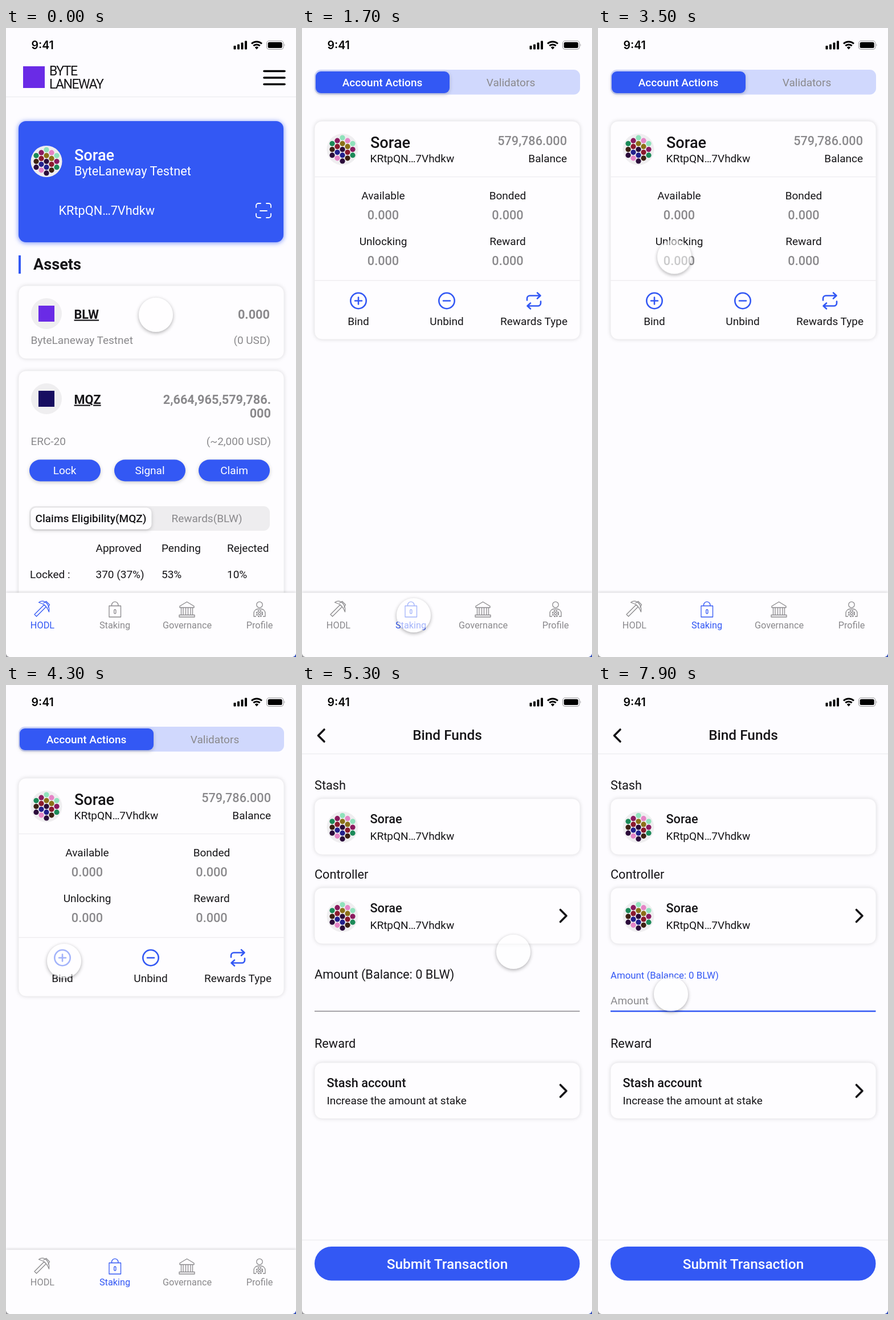
Recreate the animation shown at these times as an HTML page. Size 509 px wide and 1101 px high, loop 8000 ms.

```html
<!DOCTYPE html>
<html lang="en">
<head>
<meta charset="utf-8">
<title>Wallet staking flow</title>
<style>
  :root { --blue: #3358f4; --ink: #161518; --grey: #8a898c; --loop: 8s; }
  html, body { margin: 0; width: 100%; height: 100%; overflow: hidden; background: #fdfcff; }
  svg { display: block; width: 509px; height: 1101px; }
  text { font: 400 19px Roboto, sans-serif; fill: var(--ink); }
  .s12 { font-size: 16.3px; }
  .s16 { font-size: 21.7px; }
  .s18 { font-size: 24.4px; }
  .s20 { font-size: 27.1px; }
  .med { font-weight: 500; }
  .bold { font-weight: 700; }
  .grey { fill: var(--grey); }
  .white { fill: #fff; }
  .mid { text-anchor: middle; }
  .end { text-anchor: end; }
  .under { text-decoration: underline; text-decoration-thickness: 1.6px; text-underline-offset: 2px; }
  .clock { font: 600 19.5px Inter, sans-serif; fill: #000; }
  .word { font-size: 23px; letter-spacing: -1.5px; }
  .blue { fill: var(--blue); }
  .card { fill: #fefdff; stroke: #efeef1; filter: drop-shadow(0 0 3px rgba(0, 0, 0, .13)); }
  .hero { fill: var(--blue); filter: drop-shadow(0 1px 4px rgba(51, 88, 244, .7)); }
  .lift { filter: drop-shadow(0 2px 3px rgba(0, 0, 0, .2)); }
  .rule { stroke: #efeef1; stroke-width: 1.5; }
  .disc { fill: #efeef0; }
  .line { fill: none; stroke: var(--ink); stroke-width: 3.6; stroke-linecap: round; stroke-linejoin: round; }
  .act { fill: none; stroke: var(--blue); stroke-width: 2.6; stroke-linecap: round; stroke-linejoin: round; }

  .tab { color: var(--grey); }
  .tab text { fill: currentColor; font-size: 16.3px; text-anchor: middle; }
  .tab path, .tab circle, .tab rect { fill: none; stroke: currentColor; stroke-width: 1.3; stroke-linejoin: round; }

  .home, .stake, .bind, .nav, .idle, .focus, .off, .on { animation: var(--loop) step-end infinite; }
  .home { animation-name: home; }
  .stake { animation-name: stake; }
  .bind { animation-name: bind; }
  .nav { animation-name: nav; }
  .idle { animation-name: idle; }
  .focus { animation-name: focus; }
  .off { animation-name: off; }
  .on { animation-name: on; }
  @keyframes home { 0% { opacity: 1 } 20%, 100% { opacity: 0 } }
  @keyframes stake { 0% { opacity: 0 } 20% { opacity: 1 } 56.25%, 100% { opacity: 0 } }
  @keyframes bind { 0% { opacity: 0 } 56.25%, 100% { opacity: 1 } }
  @keyframes nav { 0% { opacity: 1 } 56.25%, 100% { opacity: 0 } }
  @keyframes idle { 0% { opacity: 1 } 97.5%, 100% { opacity: 0 } }
  @keyframes focus { 0% { opacity: 0 } 97.5%, 100% { opacity: 1 } }
  @keyframes off { 0% { color: var(--blue) } 20%, 100% { color: var(--grey) } }
  @keyframes on { 0% { color: var(--grey) } 20%, 100% { color: var(--blue) } }

  .touch {
    position: absolute; left: -30px; top: -30px; width: 60px; height: 60px; border-radius: 50%;
    background: rgba(255, 255, 255, .55);
    box-shadow: 0 2px 6px rgba(0, 0, 0, .32);
    animation: touch var(--loop) ease-in-out infinite;
  }
  @keyframes touch {
    0%, 1.25% { transform: translate(263px, 502px) }
    12.5%, 22.5% { transform: translate(196px, 1028px) }
    33.75%, 36.25% { transform: translate(199px, 233px) }
    48.75%, 57.5% { transform: translate(102px, 483px) }
    66.25% { transform: translate(371px, 467px) }
    76.25%, 88.75% { transform: translate(391px, 433px) }
    97.5%, 100% { transform: translate(128px, 541px) }
  }
</style>
</head>
<body>
<svg viewBox="0 0 509 1101">
  <defs>
    <g id="avatar"><circle class="disc" r="27.5"/></g>
    <path id="next" class="line" d="M-5.5-10.5 5 0-5.5 10.5"/>
  </defs>

  <g class="home">
    <rect x="30" y="67" width="38" height="38" fill="#6a2be6"/>
    <text class="word" x="76" y="83">BYTE</text>
    <text class="word" x="76" y="106">LANEWAY</text>
    <path d="M453 75.5h36M453 87h36M453 98.5h36" stroke="#000" stroke-width="3.6" stroke-linecap="round"/>
    <path class="rule" d="M0 120.5h509"/>

    <rect class="hero" x="22" y="163" width="465" height="212" rx="13"/>
    <use href="#avatar" x="71" y="233.5"/>
    <text class="s20 med white" x="120" y="232">Sorae</text>
    <text class="s16 white" x="120" y="257.5">ByteLaneway Testnet</text>
    <text class="s16 white" x="92.5" y="327">KRtpQN…7Vhdkw</text>
    <path d="M439 314v-3a4 4 0 0 1 4-4h4M457 307h4a4 4 0 0 1 4 4v3M465 325v3a4 4 0 0 1-4 4h-4M447 332h-4a4 4 0 0 1-4-4v-3M446 320h12" fill="none" stroke="#fff" stroke-width="1.8" stroke-linecap="round"/>

    <rect class="blue" x="22" y="398" width="4" height="32"/>
    <text class="s20 bold" x="48" y="423">Assets</text>

    <rect class="card" x="22" y="451" width="466" height="128" rx="13"/>
    <circle class="disc" cx="71" cy="500" r="27"/>
    <rect x="57" y="486" width="28" height="28" fill="#6a2be6"/>
    <text class="s16 bold under" x="119.5" y="508.5">BLW</text>
    <text class="s16 bold grey end" x="463" y="509">0.000</text>
    <text class="grey" x="43.5" y="553">ByteLaneway Testnet</text>
    <text class="grey end" x="464" y="553">(0 USD)</text>

    <rect class="card" x="22" y="600" width="466" height="440" rx="13"/>
    <circle class="disc" cx="71" cy="649" r="27"/>
    <rect x="57" y="635" width="28" height="28" fill="#170d60"/>
    <text class="s16 bold under" x="119.5" y="657.5">MQZ</text>
    <text class="s16 bold grey end" x="465" y="658">2,664,965,579,786.</text>
    <text class="s16 bold grey end" x="465" y="682">000</text>
    <text class="grey" x="43.5" y="729.5">ERC-20</text>
    <text class="grey end" x="465" y="729.5">(~2,000 USD)</text>

    <g class="blue lift">
      <rect x="41" y="755.5" width="125" height="38" rx="19"/>
      <rect x="190" y="755.5" width="125" height="38" rx="19"/>
      <rect x="338" y="755.5" width="125" height="38" rx="19"/>
    </g>
    <text class="white mid" x="103" y="781">Lock</text>
    <text class="white mid" x="252.5" y="781">Signal</text>
    <text class="white mid" x="400.5" y="781">Claim</text>

    <rect x="41" y="837" width="422" height="43" rx="11" fill="#eeedef"/>
    <rect class="lift" x="43.5" y="839.5" width="212" height="38" rx="9" fill="#fefdff"/>
    <text class="med mid" x="149" y="865">Claims Eligibility(MQZ)</text>
    <text class="grey mid" x="352.5" y="865">Rewards(BLW)</text>

    <text x="157.5" y="917">Approved</text>
    <text x="273" y="917">Pending</text>
    <text x="388" y="917">Rejected</text>
    <text x="42" y="962.5">Locked :</text>
    <text x="157.5" y="962.5">370 (37%)</text>
    <text x="273" y="962.5">53%</text>
    <text x="388" y="962.5">10%</text>
  </g>

  <g class="stake">
    <rect x="22" y="73" width="466" height="43.5" rx="11" fill="#d0d8fd"/>
    <rect class="blue lift" x="24" y="76" width="235" height="38" rx="9"/>
    <text class="med white mid" x="141" y="102">Account Actions</text>
    <text class="grey mid" x="366.5" y="102">Validators</text>

    <rect class="card" x="22" y="163" width="466" height="382" rx="13"/>
    <path class="rule" d="M22 260.5h466M22 442h466"/>
    <use href="#avatar" x="71" y="212.5"/>
    <text class="s20 med" x="120" y="210">Sorae</text>
    <text x="119.5" y="234.5">KRtpQN…7Vhdkw</text>
    <text class="s16 med grey end" x="465" y="205">579,786.000</text>
    <text class="end" x="465" y="234.5">Balance</text>

    <text class="mid" x="142.5" y="299.5">Available</text>
    <text class="mid" x="361" y="299.5">Bonded</text>
    <text class="mid" x="142.5" y="379.5">Unlocking</text>
    <text class="mid" x="361" y="379.5">Reward</text>
    <g class="zeros">
      <text class="s16 med grey mid" x="142.5" y="335">0.000</text>
      <text class="s16 med grey mid" x="361" y="335">0.000</text>
      <text class="s16 med grey mid" x="142.5" y="415">0.000</text>
      <text class="s16 med grey mid" x="361" y="415">0.000</text>
    </g>

    <g class="act">
      <circle cx="99" cy="477.5" r="13.7"/>
      <path d="M93 477.5h12M99 471.5v12"/>
      <circle cx="254" cy="477.5" r="13.7"/>
      <path d="M248 477.5h12"/>
      <path d="M413 463.5l5.5 5-5.5 5M418 468.5h-18a5 5 0 0 0-5 5v3M401 481.500l-5.500 5 5.500 5M396 486.500h18a5 5 0 0 0 5-5v-3"/>
    </g>
    <text class="mid" x="99" y="519.5">Bind</text>
    <text class="mid" x="254" y="519.5">Unbind</text>
    <text class="mid" x="407" y="519.5">Rewards Type</text>
  </g>

  <g class="nav">
    <rect x="0" y="988.5" width="509" height="130" fill="#fefdff" style="filter: drop-shadow(0 -1px 2px rgba(0, 0, 0, .18))"/>
    <g class="tab off">
      <path d="M50 1026.500l17-17 3.500 3.500-17 17zM57.500 1005.500c5-3.500 10-2.500 13.500 1s5.500 8.500 4.500 15.500c-1.500-4.500-4-8-6.500-10.500s-6.500-4.500-11.500-6zM65.500 1007l5-3.500 6 6-3 5"/>
      <text x="64" y="1051">HODL</text>
    </g>
    <g class="tab on">
      <rect x="181" y="1011.5" width="20.500" height="19.500"/>
      <path d="M185.500 1011.500v-1.500a5.700 5.700 0 0 1 11.400 0v1.500"/>
      <rect x="189.700" y="1018" width="3.200" height="7" rx="1.600"/>
      <text x="191" y="1051">Staking</text>
    </g>
    <g class="tab">
      <path d="M305 1012l12.500-7.500 12.500 7.500v2.500h-25zM307.500 1014.500v13M311 1014.500v13M315.500 1014.500v13M319.500 1014.500v13M324 1014.500v13M327.500 1014.500v13M306 1027.500h23M304 1031h27v-3.500h-27z"/>
      <text x="318" y="1051">Governance</text>
    </g>
    <g class="tab">
      <circle cx="445" cy="1009.500" r="5.200"/>
      <path d="M439 1030h-4v-5.500c0-4 3-7 7-7.500h6c4 .5 7 3.500 7 7.500v5.500h-4"/>
      <circle cx="445" cy="1025" r="5" stroke-dasharray="2.600 1.330" style="stroke-width: 2.400"/>
      <circle cx="445" cy="1025" r="2"/>
      <text x="445" y="1051">Profile</text>
    </g>
  </g>

  <g class="bind">
    <path class="line" d="M39 78 28.500 88.500 39 99"/>
    <text class="s18 med mid" x="255" y="96">Bind Funds</text>
    <path class="rule" d="M0 120.500h509"/>

    <text class="s16" x="22" y="183">Stash</text>
    <rect class="card" x="22" y="199" width="466" height="98" rx="13"/>
    <use href="#avatar" x="71" y="249"/>
    <text class="s16 med" x="119.500" y="241.500">Sorae</text>
    <text x="119.500" y="271">KRtpQN…7Vhdkw</text>

    <text class="s16" x="22" y="339">Controller</text>
    <rect class="card" x="22" y="355" width="466" height="98" rx="13"/>
    <use href="#avatar" x="71" y="405"/>
    <text class="s16 med" x="119.500" y="397.500">Sorae</text>
    <text x="119.500" y="427">KRtpQN…7Vhdkw</text>
    <use href="#next" x="459" y="404"/>

    <g class="idle">
      <text class="s16" x="22" y="514">Amount (Balance: 0 BLW)</text>
      <path d="M22 571h465.500" stroke="#88878c" stroke-width="1.500"/>
    </g>
    <g class="focus">
      <text class="blue" x="22" y="514" style="font-size: 16.800px">Amount (Balance: 0 BLW)</text>
      <text class="grey" x="22" y="558.500">Amount</text>
      <path d="M22 571h465.500" stroke="#3358f4" stroke-width="2.700"/>
    </g>

    <text class="s16" x="22" y="635">Reward</text>
    <rect class="card" x="22" y="661" width="466" height="98" rx="13"/>
    <text class="s16 med" x="43.500" y="704">Stash account</text>
    <text x="43.500" y="733.500">Increase the amount at stake</text>
    <use href="#next" x="459" y="710.500"/>

    <path class="rule" d="M0 971.500h509"/>
    <rect class="blue" x="22" y="983" width="465.500" height="59.500" rx="29.700"/>
    <text class="s18 med white mid" x="255" y="1022">Submit Transaction</text>
  </g>

  <text class="clock" x="44.500" y="36.500">9:41</text>
  <g>
    <rect x="399.500" y="31" width="4" height="6.500" rx="1"/>
    <rect x="406" y="28.500" width="4" height="9" rx="1"/>
    <rect x="412.500" y="25.500" width="4" height="12" rx="1"/>
    <rect x="419" y="22.500" width="4" height="15" rx="1"/>
    <path d="M431 27.500a13 13 0 0 1 18 0M434.300 31.200a8.200 8.200 0 0 1 11.400 0" fill="none" stroke="#000" stroke-width="3"/>
    <path d="M436.800 34a4.800 4.800 0 0 1 6.400 0l-3.200 3.600z"/>
    <rect x="457.500" y="22.500" width="29.500" height="14.800" rx="4.500" fill="none" stroke="#a3a2a5" stroke-width="1.200"/>
    <rect x="459.700" y="24.700" width="25" height="10.400" rx="2.600"/>
    <path d="M488.500 27.500q2 2.400 0 4.800z" fill="#a3a2a5"/>
  </g>
  <path d="M0 1095q1 5 6 6H0z" fill="#9b9a9e"/>
  <path d="M509 1095q-1 5-6 6h6z" fill="#2c49b8"/>
</svg>
<div class="touch"></div>

<script>
  // Identicon: five columns of dots in a hexagon.
  const mint = '#8fe2bb', plum = '#8a1a5e', pink = '#e584c6', green = '#1b8a58', olive = '#8b7018',
        wine = '#8b1a2e', brown = '#3d2113', navy = '#23208c', night = '#2b0b3a';
  const columns = [
    [green, brown, night],
    [plum, wine, navy, pink],
    [mint, olive, night, navy, night],
    [pink, olive, wine, brown],
    [mint, plum, green]
  ];
  const avatar = document.getElementById('avatar');
  columns.forEach((col, c) => col.forEach((fill, r) => {
    const dot = document.createElementNS('http://www.w3.org/2000/svg', 'circle');
    const at = { cx: (c - 2) * 9, cy: (r - (col.length - 1) / 2) * 10.2, r: 4.6, fill };
    for (const key in at) dot.setAttribute(key, at[key]);
    avatar.append(dot);
  }));
</script>
</body>
</html>
```
